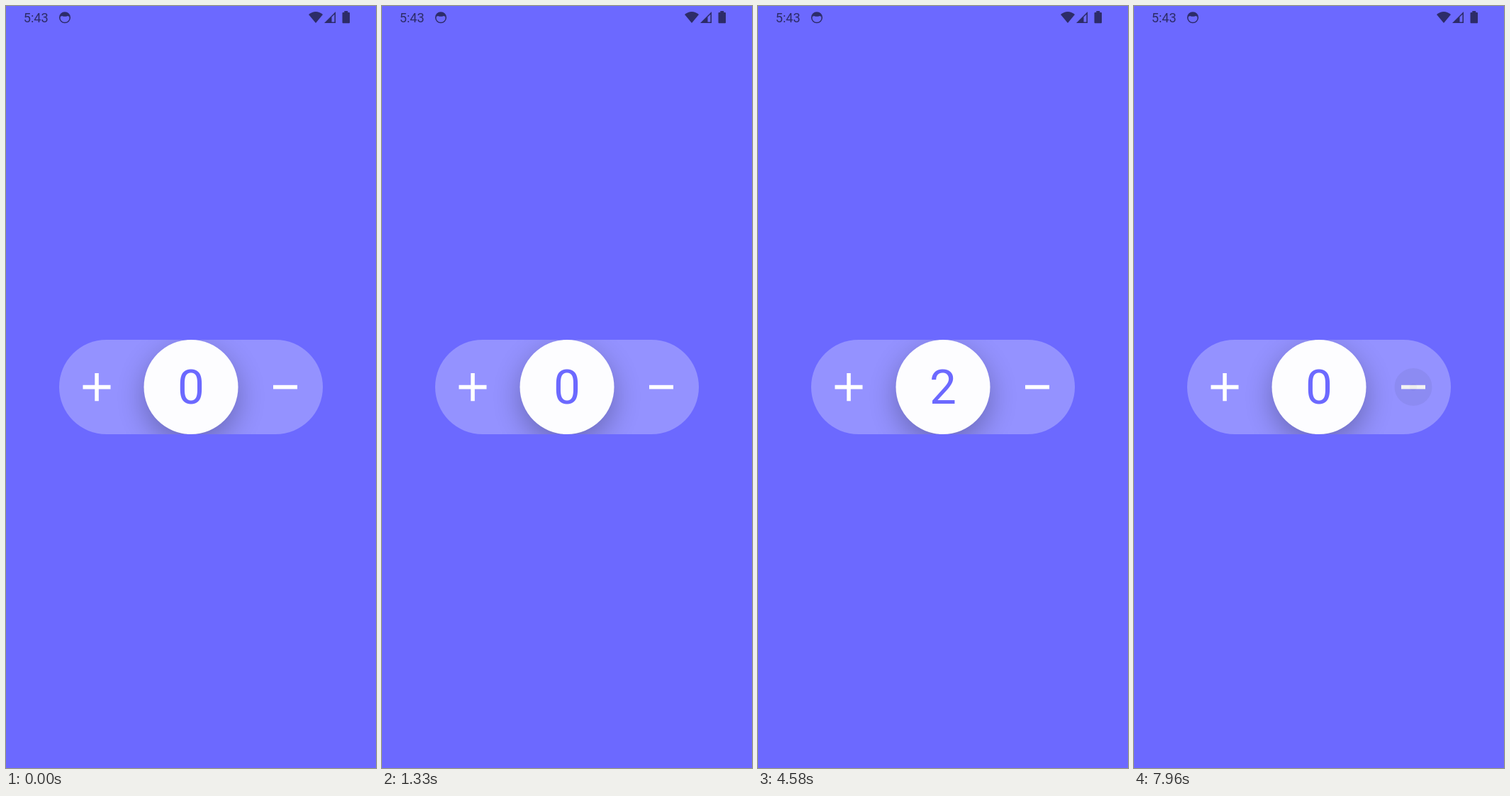
Write an HTML page that moves like this. It is 522x1073 px and loops after 8000 ms.

```html
<!DOCTYPE html>
<html lang="en">
<head>
<meta charset="utf-8">
<title>Counter</title>
<style>
  html, body { margin: 0; width: 100%; height: 100%; overflow: hidden; background: #6c69ff; }
  svg { display: block; width: 100vw; height: 100vh; }
  text { font-family: Roboto, "Noto Sans", sans-serif; }
</style>
</head>
<body>
<svg viewBox="0 0 522 1073" preserveAspectRatio="none">
  <defs>
    <clipPath id="pill"><rect x="75" y="470" width="372" height="133" rx="66.5"/></clipPath>
    <filter id="soft" x="-60%" y="-60%" width="220%" height="220%"><feGaussianBlur stdDeviation="19"/></filter>
  </defs>
  <rect width="522" height="1073" fill="#6c69ff"/>

  <g fill="#2d2c68">
    <text x="24.7" y="23" font-size="18.2">5:43</text>
    <circle cx="83" cy="16.3" r="7.3" fill="none" stroke="#2d2c68" stroke-width="1.5"/>
    <path d="M76 16.5Q77 9 83 9T90 16.5Q88 13.6 86.5 14.2Q83 15.2 79.5 14.2Q78 13.6 76 16.5Z"/>
    <path d="M427 12Q437 4 447 12L437 24Z"/>
    <path fill-rule="evenodd" d="M449 24L465 8V24ZM459.5 15.6V22.4H463.4V11.8Z"/>
    <path d="M477.3 9V7H482.2V9H484Q485 9 485 10V23Q485 24.2 484 24.2H475.5Q474.5 24.2 474.5 23V10Q474.5 9 475.5 9Z"/>
  </g>

  <g clip-path="url(#pill)">
    <rect x="75" y="470" width="372" height="133" fill="#fff" fill-opacity=".27"/>
    <circle cx="261" cy="550" r="67" opacity=".27" filter="url(#soft)"/>
  </g>
  <g fill="#fff">
    <path d="M108.5 533.8H125.3V517H130.8V533.8H147.5V539.4H130.8V556.2H125.3V539.4H108.5Z"/>
    <rect x="377" y="533.8" width="34" height="5.6"/>
    <circle cx="261" cy="536.5" r="66.5" fill="#fdfdff"/>
  </g>
  <g id="ink">
    <circle cy="536.5" r="26.5"/>
    <circle cy="536.5"/>
  </g>
  <text id="count" x="261" y="560" font-size="67.5" text-anchor="middle" fill="#6c69ff">0</text>
</svg>
<script>
  const LOOP = 8000, HOLD = 240, FADE = 280;
  const PLUS = 128, MINUS = 394;
  // press time, button centre, count after release
  const taps = [
    [3000, PLUS, 1],
    [3710, PLUS, 2],
    [5160, MINUS, 1],
    [6050, MINUS, 0],
    [7890, MINUS, 0]
  ];
  const [glow, splash] = document.querySelectorAll('#ink circle');
  const count = document.getElementById('count');
  const clamp = v => Math.max(0, Math.min(1, v));

  function draw(t) {
    let value = 0, light = 0, spread = 0, x = PLUS, out = 0;
    for (const [at, cx, next] of taps) {
      const age = t - at;
      if (age < 0) break;
      if (age >= HOLD) value = next;
      x = cx;
      light = clamp(age / 100);
      spread = clamp(age / 225);
      out = 1 - clamp((age - HOLD) / FADE);
    }
    glow.setAttribute('cx', x);
    splash.setAttribute('cx', x);
    glow.setAttribute('opacity', 0.07 * light * out);
    splash.setAttribute('opacity', 0.035 * light * out);
    splash.setAttribute('r', 3 + 23.5 * spread * spread);
    if (count.textContent !== String(value)) count.textContent = value;
  }

  const start = performance.now();
  function tick() {
    draw((performance.now() - start) % LOOP);
    requestAnimationFrame(tick);
  }
  tick();
</script>
</body>
</html>
```
